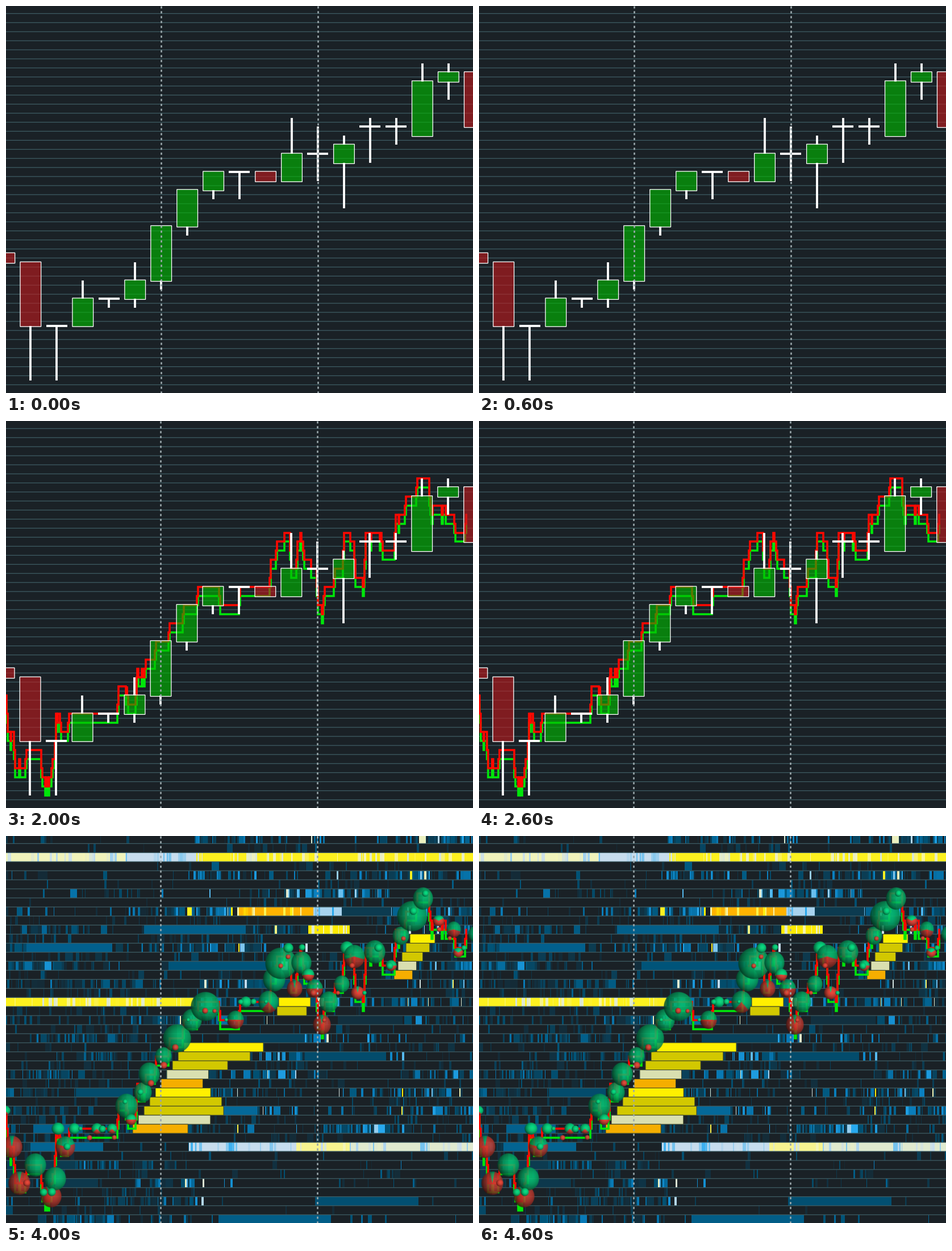
These frames come from a looping animation (822x681 px, 5 s). A matplotlib script:

```python
import matplotlib.pyplot as plt
import numpy as np
from matplotlib.animation import FuncAnimation
from matplotlib.collections import LineCollection
from matplotlib.colors import LinearSegmentedColormap
from matplotlib.patches import Rectangle

W, H, DPI = 822, 681, 100
PX = 72 / DPI
ROW, ROWS = 15.93, 43
SLOT = 45.97
BG = "#1a2126"
GRID = "#3d5b62"

# Candles: each opens at the previous close unless there is a gap.
CLOSES = [27, 28, 35, 35, 32, 32, 30, 24, 20, 18,
          18, 19, 16, 16, 15, 13, 13, 8, 7, 13]
GAPS = {13: 1, 14: -2, 16: 1}
UP = [0, 0, 0, 2, 0, 2, 0, 0, 0, 0, 0, 4, 3, 1, 1, 1, 2, 1, 0]
DOWN = [0, 6, 6, 0, 1, 1, 1, 1, 1, 3, 0, 0, 3, 5, 4, 2, 0, 2, 0]
BODY = {1: (0, .73, 0, .62), -1: (.77, .1, .11, .6)}

# Clusters of trades (x, price row, radius) drive the quotes and the bubbles.
TRADES = np.array([
    (-2, 30, 9), (10, 34, 18), (23, 38, 19), (51, 36, 19), (79, 39.5, 18),
    (86, 37.5, 19), (91, 32, 11), (104, 34, 17), (120, 32, 10),
    (160, 32, 10), (186, 32, 9), (212, 29.5, 20), (220, 31, 10),
    (241, 28, 16), (252, 26, 19), (277, 24, 15), (301, 22, 25),
    (327, 20, 18), (351, 18.5, 26), (404, 20, 15), (422, 18, 10),
    (462, 18, 18), (472, 15.5, 20), (484, 13.7, 28), (497, 12, 9),
    (508, 16.5, 14), (520, 13.7, 18), (532, 15, 11), (543, 16.5, 15),
    (556, 20.5, 16), (568, 18, 17), (591, 16, 14), (600, 12, 12),
    (613, 13, 19), (619, 17, 12), (649, 12.5, 19), (678, 14, 10),
    (695, 10.7, 15), (715, 8.5, 27), (734, 6.6, 18), (761, 9, 10),
    (788, 10, 13), (796, 12.5, 9), (826, 10.5, 13),
])

# Resting volume: row, from, to, level.
WALLS = [
    (2, 0, 210, .89), (2, 210, 335, .82), (2, 335, W, .94),
    (8, 407, 540, .99), (8, 540, 590, .8), (10, 531, 604, .95),
    (18, 0, 330, .94), (34, 322, 510, .82), (34, 510, 604, .91),
    (34, 604, W, .86),
]
# Steps of filled volume: first row, count, x, shift per row, width, swing.
LADDERS = [(23, 10, 313, -10, 105, 35), (11, 5, 711, -7, 38, 6),
           (18, 2, 480, -3, 46, 10)]
YELLOWS = ["#fff000", "#d2c800", "#d2c800", "#d9dfb0", "#f5ae00"]
HEAT = LinearSegmentedColormap.from_list("heat", [
    (0, BG), (.2, "#12303f"), (.4, "#005478"), (.6, "#0a80c0"),
    (.72, "#28aaf0"), (.82, "#c8deee"), (.9, "#f6f6b4"),
    (.95, "#fff000"), (1, "#ffa800"),
])

fig = plt.figure(figsize=(W / DPI, H / DPI), dpi=DPI, facecolor=BG)
ax = fig.add_axes([0, 0, 1, 1])


def y_at(row):
    return 5.4 + ROW * row


def box(x, y, w, h, **style):
    ax.add_patch(Rectangle((x, y), w, h, snap=False, **style))


def ask_path():
    """Step line through the trades, flickering where the price jumps."""
    rng = np.random.default_rng(6)
    xs, rows = [], []
    x, row = TRADES[:, 0], np.floor(TRADES[:, 1])
    edges = np.concatenate([[-5], (x[1:] + x[:-1]) / 2, [W + 5]])
    for i, (start, end) in enumerate(zip(edges, edges[1:])):
        jump = row[i] - row[max(i - 1, 0)]
        if abs(jump) > 1:
            xs.append(start - 2)
            rows.append(row[i] - jump // 2)
        xs.append(start)
        rows.append(row[i])
        if abs(jump) > 2:
            for at in rng.uniform(start + 1, end - 4, 2):
                xs += [at, at + 2]
                rows += [row[i] + rng.integers(-1, 2), row[i]]
    order = np.argsort(xs, kind="stable")
    return np.array(xs)[order], np.array(rows)[order]


ASK_X, ASK = ask_path()


def ask_at(x):
    return ASK[max(np.searchsorted(ASK_X, x, "right") - 1, 0)]


def draw_grid():
    y = y_at(np.arange(ROWS) + .5)
    ax.hlines(y, 0, W, color=GRID, lw=1.3 * PX, zorder=1, snap=False)


def draw_sessions(dx):
    for x in (272.5, 548.5):
        ax.plot([x + dx] * 2, [0, H], color="#9aa8ac", lw=2.6 * PX, zorder=9,
                ls=(0, (1.5, 1.8)), dash_capstyle="butt")


def draw_candles(dx):
    bars = []
    for i, (before, close) in enumerate(zip(CLOSES, CLOSES[1:])):
        x = -2.8 + SLOT * i + dx
        start = before + GAPS.get(i, 0)
        top, bottom = sorted((start, close))
        y0, y1 = y_at(top), y_at(bottom)
        bars += [[(x, y0 - UP[i] * ROW), (x, y0)],
                 [(x, y1), (x, y1 + DOWN[i] * ROW)]]
        if start == close:
            bars.append([(x - 18.5, y0), (x + 18.5, y0)])
            continue
        rect = (x - 18.2, y0 - 1.2, 36.7, y1 - y0 + 2.4)
        box(*rect, fc=BODY[np.sign(start - close)], ec="none", zorder=4)
        box(*rect, fill=False, ec="white", lw=1.3 * PX, zorder=6)
    ax.add_collection(LineCollection(bars, colors="white", lw=3.8 * PX,
                                     capstyle="butt", zorder=5))


def draw_steps(x, rows, color):
    ax.plot(x, y_at(np.asarray(rows)), color=color, lw=3.6 * PX,
            drawstyle="steps-post", solid_joinstyle="miter", zorder=3)


def draw_trades():
    """Each trade hits either the ask or the bid one row below."""
    rng = np.random.default_rng(4)
    x = np.union1d(ASK_X, np.cumsum(rng.uniform(3, 9, 140)))
    x = x[x < W + 5]
    draw_steps(x, [ask_at(v) + (rng.random() < .35) for v in x], "white")


def draw_quotes(dx):
    draw_steps(ASK_X + dx, ASK + 1, "#00e60a")
    draw_steps(ASK_X + dx, ASK, "#ff0800")


def draw_ball(x, y, r, share):
    """Shaded sphere with a wedge at the bottom for the share of sells."""
    rx, ry = r, r * 1.1 if 12 < r < 22 else r
    n = int(4 * r) + 8
    u, v = np.meshgrid(*[(np.arange(n) + .5) / n * 2 - 1] * 2)
    d = np.hypot(u, v)
    sell = np.abs(np.arctan2(u, v)) < np.pi * share
    rgb = np.where(sell[..., None], (.87, .27, .22), (.03, .83, .49))
    light = 1.06 - .5 * np.hypot(u - .2, v + .15) ** 2
    if r > 12:
        light = light * .84 + .05 * (u > 0)
    alpha = np.clip((1 - d) * n / 4, 0, 1) * (.86 if r > 12 else .97)
    img = np.dstack([np.clip(rgb * light[..., None], 0, 1), alpha])
    ax.imshow(img, extent=(x - rx, x + rx, y + ry, y - ry), aspect="auto",
              interpolation="bilinear", zorder=6)


def draw_balls():
    fall = np.diff(TRADES[:, 1], prepend=TRADES[0, 1])
    for (x, row, r), drop in zip(TRADES, fall):
        draw_ball(x, y_at(row), r, np.clip(.25 + .17 * drop, 0, .93))
    rng = np.random.default_rng(8)
    for x in np.arange(38, W, 22) + rng.uniform(-6, 6, 36):
        sell = rng.integers(2)
        draw_ball(x, y_at(ask_at(x) + sell), rng.uniform(3, 7.5), sell)


def heat_map():
    rng = np.random.default_rng(11)
    heat = np.zeros((ROWS, W))
    for row in range(ROWS):
        even = row % 2 == 0
        phase, x = rng.uniform(0, 6.3), 0
        while x < W:
            quiet = row > 34 and x > 330 or row < 8 and x < 330
            wave = .55 + .45 * np.sin(x / 60 + phase)
            busy = (.75 if even else .28) * wave * (.2 if quiet else 1)
            w = int(rng.integers(1, 5 if rng.random() < .8 else 14))
            if rng.random() < busy:
                peak = (.75 if x > 300 else .55) if even else .35
                level = .12 + peak * rng.beta(1.3, 2.4)
                if even and x > 300 and rng.random() < .05:
                    level = rng.uniform(.75, .95)
                heat[row, x:x + w] = level
            x += w
        if even and row > 6:
            x, w = rng.integers(0, 600), rng.integers(50, 200)
            heat[row, x:x + w] = rng.uniform(.2, .5)
    for row, x0, x1, level in WALLS:
        heat[row, x0:x1] = level
        for x in rng.integers(x0, x1 - 6, (x1 - x0) // 10):
            heat[row, x:x + rng.integers(1, 7)] = level + rng.uniform(-.1, .01)
    return HEAT(heat)


def draw_heat():
    ax.imshow(heat_map(), extent=(0, W, y_at(ROWS - .5), y_at(-.5)),
              aspect="auto", interpolation="nearest", zorder=0)
    for first, count, x, shift, width, swing in LADDERS:
        for k in range(count):
            w = width + swing * np.cos(2 * np.pi * k / 7)
            box(x + shift * k, y_at(first + k - .5), w, ROW,
                fc=YELLOWS[k % len(YELLOWS)], ec="#3c4428", lw=PX, zorder=2)


def draw(scene):
    ax.clear()
    ax.axis("off")
    dx = -.7 if scene in (2, 4) else 0
    draw_grid()
    draw_sessions(dx)
    if scene < 3:
        draw_candles(dx)
    if scene == 1:
        draw_trades()
    if scene >= 2:
        draw_quotes(dx)
    if scene >= 3:
        draw_balls()
    if scene == 4:
        draw_heat()
    ax.set_xlim(0, W)
    ax.set_ylim(H, 0)
    return []


anim = FuncAnimation(fig, draw, frames=5, interval=1000, repeat=True,
                     repeat_delay=0, blit=False)
plt.show()
```
